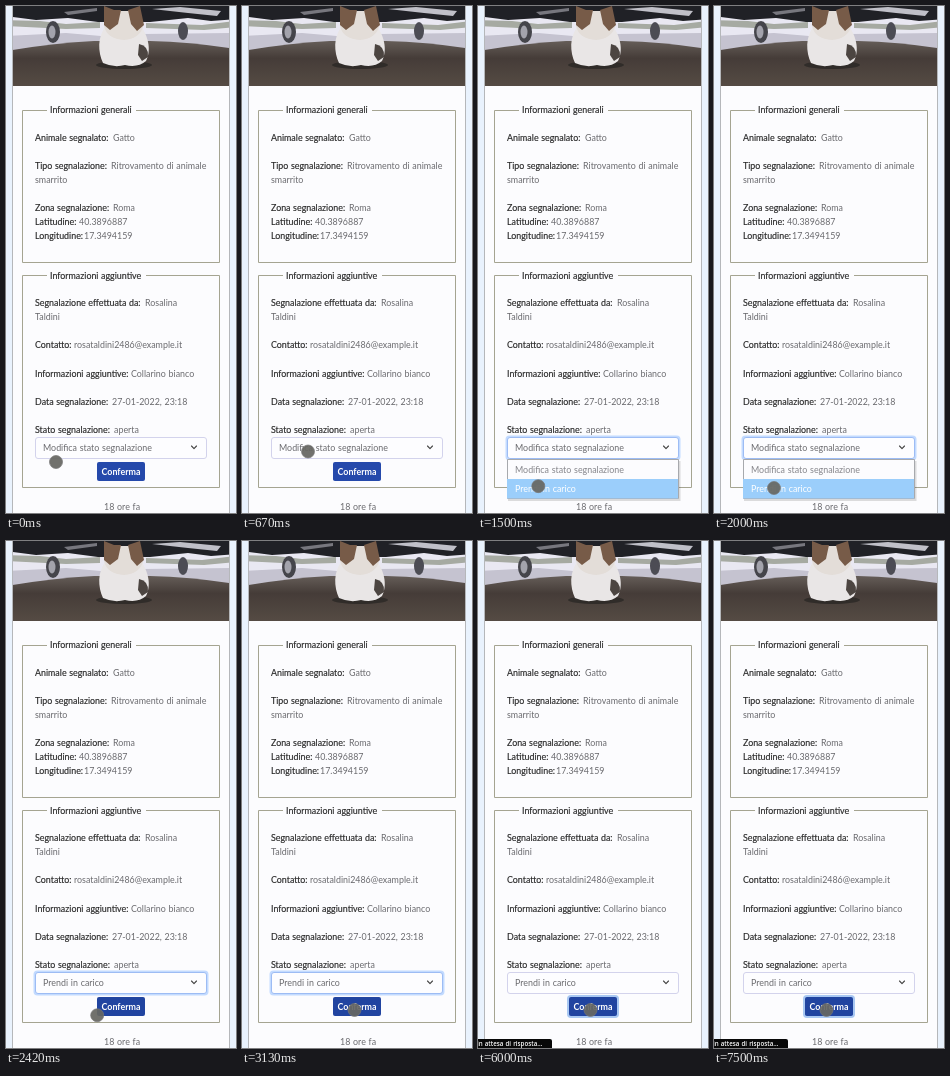
These frames come from a looping animation (230 by 507 pixels, 8000 ms). An HTML page:

```html
<!DOCTYPE html>
<html lang="it">
<head>
<meta charset="utf-8">
<style>
html, body { margin: 0; width: 100%; height: 100%; overflow: hidden; background: #e9f2fd; }
svg { display: block; width: 230px; height: 507px; }
text { font: 8.9px Lato, sans-serif; word-spacing: .5px; fill: #6a6a6e; }
.label { fill: #282828; stroke: #282828; stroke-width: .15px; word-spacing: .3px; }
.bold { font-weight: 700; fill: #fff; }
.box { fill: none; stroke: #a5a491; }
</style>
</head>
<body>
<svg viewBox="0 0 230 507">
  <defs>
    <clipPath id="photoClip"><path d="M7 0H223V80H7z"/></clipPath>
    <linearGradient id="ground" x2="0" y2="1">
      <stop stop-color="#655d58"/><stop offset=".35" stop-color="#453c38"/><stop offset="1" stop-color="#574d45"/>
    </linearGradient>
    <filter id="soft"><feGaussianBlur stdDeviation=".6"/></filter>
  </defs>

  <path d="M6.5 -1H223.5V508H6.5z" fill="#fcfcfe" stroke="#b5b7ba"/>

  <g clip-path="url(#photoClip)">
    <path d="M7 0H223V80H7z" fill="#e9e8f2"/>
    <g filter="url(#soft)">
      <path d="M0 30L60 27 95 30V46H0zM136 28L230 27V46H136z" fill="#c5c3d0"/>
      <path d="M0 14L34 15 60 18 94 16V22L60 23 0 20z" fill="#a6aaa2"/>
      <path d="M140 17L196 19 230 15V21L198 24 140 22z" fill="#a6aaa2"/>
      <path d="M0 45Q48 37 88 35H144Q186 36 230 43V84H0z" fill="url(#ground)"/>
      <ellipse cx="47" cy="26" rx="7" ry="11" fill="#45454b"/>
      <ellipse cx="46" cy="26" rx="3.5" ry="6.5" fill="#a3a3ac"/>
      <ellipse cx="177" cy="25" rx="5" ry="9" fill="#4c4c54"/>
      <path d="M0 -2H230V13L205 15 182 12 144 16H92L62 12 30 14 0 10z" fill="#202126"/>
      <path d="M146 3L174 1 215 5 211 10 182 7z" fill="#c0c0c8"/>
      <path d="M58 6L91 2V5L62 9z" fill="#77777e"/>
      <ellipse cx="118" cy="59" rx="28" ry="4" fill="#302c29"/>
      <path d="M100 20C91 31 92 46 97 57Q108 62 119 59 132 62 140 55C146 44 142 28 133 18z" fill="#e9e6e6"/>
      <path d="M133 38Q143 40 142 51L136 55 132 49z" fill="#4c4541"/>
      <path d="M99 2L106 5H126L133 2 137 21Q133 33 118 34 101 33 98 20z" fill="#e3ddd8"/>
      <path d="M98 0L108 4H115L112 18 104 24 98 19zM122 4L134 0 138 19 131 25 125 18z" fill="#775b48"/>
    </g>
  </g>

  <path class="box" d="M41 104.5H16.5V256.5H213.5V104.5H130"/>
  <path class="box" d="M41 269.5H16.5V481.5H213.5V269.5H140"/>
  <g id="details"></g>
  <text x="98" y="503.5">18 ore fa</text>

  <rect id="ring" x="27.5" y="429.5" width="175" height="25" rx="4" fill="#c3dbff"/>
  <rect id="field" x="29.5" y="431.5" width="171" height="21" rx="2.5" fill="#fdfdff"/>
  <text id="choice" x="37" y="444.5"></text>
  <path d="M185.5 440L188 442.6 190.5 440" fill="none" stroke="#444" stroke-width="1.1" stroke-linecap="round" stroke-linejoin="round"/>

  <rect id="buttonRing" x="89" y="454" width="52" height="23" rx="4" fill="#a9c8f2"/>
  <rect id="button" x="91" y="456" width="48" height="19" rx="2"/>
  <text class="bold" x="115" y="468.5" text-anchor="middle">Conferma</text>

  <g id="menu">
    <path d="M30 455H202.5V495H30z" fill="#0002"/>
    <path d="M29.5 453.5H200.5V492.5H29.5z" fill="#fcfcfe" stroke="#a7a9ad"/>
    <rect id="highlight" x="29" width="171" height="19.5"/>
    <text id="first" x="37" y="466.5">Modifica stato segnalazione</text>
    <text id="second" x="37" y="486">Prendi in carico</text>
  </g>

  <g id="status">
    <path d="M0 498H72Q74 498 74 500V507H0z" fill="#080808"/>
    <text class="bold" x="-1" y="505.3" style="font: 600 6.2px 'Open Sans', sans-serif">in attesa di risposta...</text>
  </g>

  <circle id="pointer" r="6.5" fill="#666662" fill-opacity=".93" stroke="#777" stroke-opacity=".7"/>
</svg>
<script>
const $ = id => document.getElementById(id);

// x, baseline, label, value x, value
const rows = [
  [44, 107, 'Informazioni generali'],
  [29, 134.5, 'Animale segnalato:', 107, 'Gatto'],
  [29, 162.5, 'Tipo segnalazione:', 105, 'Ritrovamento di animale'],
  [29, 176.5, '', 29, 'smarrito'],
  [29, 204.5, 'Zona segnalazione:', 107, 'Roma'],
  [29, 218.5, 'Latitudine:', 73, '40.3896887'],
  [29, 232.5, 'Longitudine:', 78, '17.3494159'],
  [44, 272.5, 'Informazioni aggiuntive'],
  [29, 299.5, 'Segnalazione effettuata da:', 139, 'Rosalina'],
  [29, 314, '', 29, 'Taldini'],
  [29, 342, 'Contatto:', 68, 'rosataldini2486@example.it'],
  [29, 370.5, 'Informazioni aggiuntive:', 125, 'Collarino bianco'],
  [29, 398.5, 'Data segnalazione:', 106, '27-01-2022, 23:18'],
  [29, 426.5, 'Stato segnalazione:', 108, 'aperta']
];
$('details').innerHTML = rows.map(([x, y, label, valueX, value = '']) =>
  `<text class="label" x="${x}" y="${y}">${label}</text>` +
  (value && `<text x="${valueX}" y="${y}">${value}</text>`)).join('');

// start, end, x, y
const moves = [[40, 640, 66, 445.5], [940, 1590, 60, 482], [2100, 2670, 112.5, 469]];

const ramp = (t, start, end) => Math.max(0, Math.min(1, (t - start) / (end - start)));
const ease = p => p * p * (3 - 2 * p);
const show = (id, on) => $(id).setAttribute('opacity', +on);
const fill = (id, color) => $(id).style.fill = color;

function draw(t) {
  let x = 50, y = 456;
  for (const [start, end, toX, toY] of moves) {
    const p = ease(ramp(t, start, end));
    x += (toX - x) * p;
    y += (toY - y) * p;
  }
  $('pointer').setAttribute('transform', `translate(${x} ${y})`);

  const onSecond = y > 473;
  show('menu', t >= 760 && t < 2080);
  $('highlight').setAttribute('y', onSecond ? 473 : 453.5);
  fill('highlight', onSecond ? '#9bcefb' : '#cbc9a8');
  fill('first', onSecond ? '#85858a' : '#f4f4ef');
  fill('second', onSecond ? '#fff' : '#555');

  const focus = ramp(t, 700, 840) * (1 - ramp(t, 3400, 3500));
  show('ring', focus);
  $('field').setAttribute('stroke', focus > .5 ? '#9dbcf4' : '#d3d3ec');
  $('choice').textContent = t < 2080 ? 'Modifica stato segnalazione' : 'Prendi in carico';

  const hovered = t > 2080 && x > 91;
  fill('button', hovered ? '#2144a0' : '#2549ab');
  show('buttonRing', ramp(t, 3400, 3500));
  show('status', t >= 3500);
}

function tick() {
  draw(performance.now() % 8000);
  requestAnimationFrame(tick);
}
tick();
</script>
</body>
</html>
```
